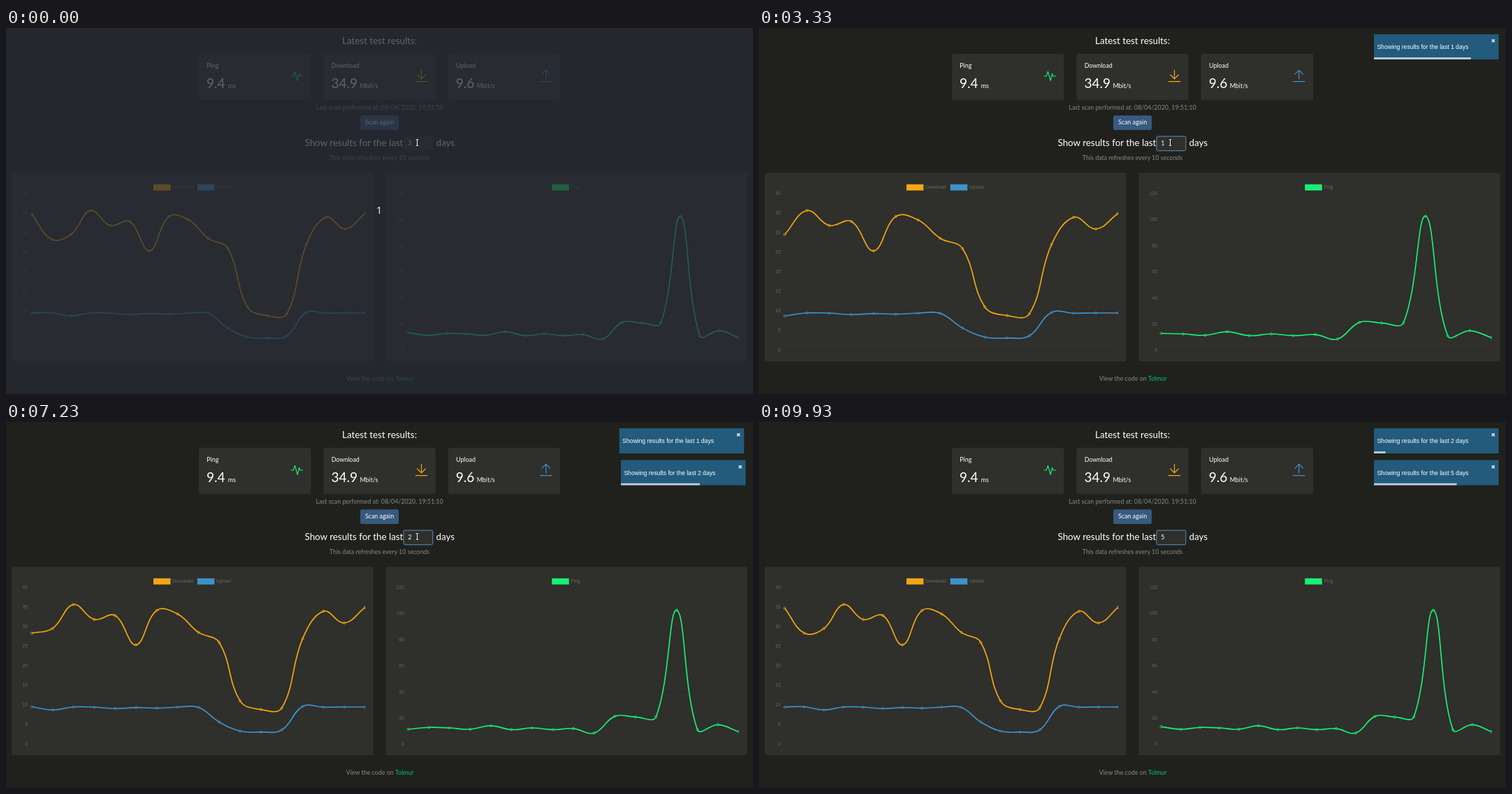
An HTML page that plays this animation: 1069 px wide and 524 px high, repeating every 9960 ms.

```html
<!DOCTYPE html>
<html lang="en">
<head>
<meta charset="utf-8">
<title>Speed test dashboard</title>
<style>
  html, body { margin: 0; width: 100%; height: 100%; overflow: hidden; background: #20211c; }
  svg { display: block; width: 100%; height: 100%; }
  text { font-family: Lato, sans-serif; font-size: 8.9px; fill: #fff; }
  .head { font-size: 13.37px; }
  .big { font-size: 19px; }
  .muted { fill: #888; }
  .mid { text-anchor: middle; }
  .axis { font: 6.7px "Liberation Sans", Arial, sans-serif; fill: #666; }
  .end { text-anchor: end; }
  .card { fill: #2f2f2c; }
  .icon { fill: none; stroke-width: 1.2; stroke-linecap: round; stroke-linejoin: round; }
  .grid { stroke: #000; stroke-opacity: .12; stroke-width: .6; }
  .line { fill: none; stroke-width: 1.67; }
  .dots { fill: rgba(0, 0, 0, .1); stroke-width: .7; }
  .note { font: 8.6px "Liberation Sans", Arial, sans-serif; }
  .cross { font: 7.6px "DejaVu Sans", sans-serif; fill-opacity: .85; }
</style>
</head>
<body>
<svg id="stage" viewBox="0 0 1069 524" preserveAspectRatio="none">
  <clipPath id="clipL"><rect x="0" y="200" width="514.4" height="290"/></clipPath>
  <clipPath id="clipR"><rect x="540" y="200" width="508.9" height="290"/></clipPath>

  <text class="head mid" x="534.5" y="22.6">Latest test results:</text>
  <g id="cards"></g>
  <path class="icon" stroke="#17f172" d="M408 69h3.2l2.3-6.6 3.6 13 2.5-10 1.4 3.6h3.7"/>
  <path class="icon" stroke="#f3a712" d="M594.5 60.3v12.4M588.7 67l5.8 5.8 5.8-5.8M586.3 76.6h16.4"/>
  <path class="icon" stroke="#3f92c8" d="M772.7 73V60.4M766.9 66.2l5.8-5.8 5.8 5.8M764.5 76.6h16.4"/>

  <text class="muted mid" x="534.5" y="116.8">Last scan performed at: 08/04/2020, 19:51:10</text>
  <rect x="507" y="125.2" width="55" height="20.8" rx="2.2" fill="#375a7f"/>
  <text class="mid" x="534.5" y="137.9">Scan again</text>

  <text class="head" x="427.5" y="169">Show results for the last</text>
  <text class="head" x="615.5" y="169">days</text>
  <rect class="card" x="569.3" y="155.4" width="41" height="20" rx="2.2"/>
  <g id="ring" fill="none">
    <rect x="568.6" y="154.7" width="42.6" height="21.4" rx="2.6" stroke="#375a7f" stroke-opacity=".6" stroke-width="1.2"/>
    <rect x="569.2" y="155.3" width="41.4" height="20.2" rx="2.2" stroke="#6485aa" stroke-width=".8"/>
  </g>
  <text id="days" x="575.2" y="167.6">3</text>
  <rect id="caret" y="160.8" width=".8" height="9" fill="#fff"/>
  <text class="muted mid" x="534.5" y="189.4">This data refreshes every 10 seconds</text>

  <g id="charts"></g>
  <text class="muted" x="486.7" y="505">View the code on <tspan fill="#00bc8c">Tolmur</tspan></text>
  <g id="toasts"></g>

  <g id="count">
    <rect width="1069" height="524" fill="#262a33" fill-opacity=".73"/>
    <text class="mid" x="534" y="266.3" style="font: 14px 'Open Sans', sans-serif">1</text>
  </g>
  <g id="pointer" fill="none" stroke-linecap="square">
    <path stroke="#111" stroke-width="2.4" d="M587 159.8h3M588.5 159.8v8.4M587 168.2h3"/>
    <path stroke="#fff" stroke-width="1.1" d="M587 159.8h3M588.5 159.8v8.4M587 168.2h3"/>
  </g>
</svg>
<script>
const LOOP = 9960, SCALE = 0.5575;
const TOP = 236.7, BASE = 461;
const $ = id => document.getElementById(id);
const clamp = (v, a, b) => Math.min(b, Math.max(a, v));
const mix = (a, b, k) => a + (b - a) * k;

function add(parent, tag, attrs, text) {
  const el = document.createElementNS('http://www.w3.org/2000/svg', tag);
  for (const k in attrs) el.setAttribute(k, attrs[k]);
  if (text) el.textContent = text;
  return parent.appendChild(el);
}

function bezier(x1, y1, x2, y2) {
  const at = (a, b, u) => 3 * (1 - u) * (1 - u) * u * a + 3 * (1 - u) * u * u * b + u * u * u;
  return x => {
    if (x <= 0) return 0;
    if (x >= 1) return 1;
    let lo = 0, hi = 1;
    for (let i = 0; i < 30; i++) {
      const m = (lo + hi) / 2;
      if (at(x1, x2, m) < x) lo = m; else hi = m;
    }
    return at(y1, y2, lo);
  };
}
const ease = bezier(.25, .1, .25, 1);
const easeInOut = bezier(.42, 0, .58, 1);
const bounce = bezier(.215, .61, .355, 1);
const outQuart = t => 1 - Math.pow(1 - clamp(t, 0, 1), 4);

// Value along [position, value] stops, eased within each segment
function track(stops, p, fn) {
  for (let i = 1; i < stops.length; i++) {
    const [a, from] = stops[i - 1], [b, to] = stops[i];
    if (p <= b) return mix(from, to, fn((p - a) / (b - a)));
  }
  return stops[stops.length - 1][1];
}

// Result cards
[[276, 'Ping', '9.4', 'ms', 41.7],
 [454.4, 'Download', '34.9', 'Mbit/s', 52],
 [632.7, 'Upload', '9.6', 'Mbit/s', 41]].forEach(([x, name, value, unit, gap]) => {
  const g = $('cards');
  add(g, 'rect', { class: 'card', x, y: 36.7, width: 160.3, height: 66.5, rx: 2.2 });
  add(g, 'text', { x: x + 11.3, y: 56.7 }, name);
  add(g, 'text', { class: 'big', x: x + 11.1, y: 86.4 }, value);
  add(g, 'text', { x: x + gap, y: 86.4 }, unit);
});

// Charts
const ORANGE = '#f3a712', BLUE = '#3f92c8', GREEN = '#17f172';
const download = [34.7, 28.3, 29.5, 35.6, 31.8, 32.8, 25.3, 34.1, 33.2, 28.5, 25.9, 11, 8.8, 9.2, 26.9, 33.9, 30.9, 34.9];
const upload = [9.45, 9.5, 8.7, 9.45, 9.4, 9.05, 9.3, 9.15, 9.4, 9.35, 5.6, 3.3, 3.05, 3.6, 9.6, 9.4, 9.45, 9.45];
const ping = [13.3, 11.3, 12.7, 12.3, 11.3, 14, 11, 12.3, 11, 11.8, 8.4, 21.2, 20.7, 21, 102.5, 11, 14.8, 9.4];
const stages = [[-2000, 18], [2247, 16], [5465, 17], [8328, 18]];

function axes(x, left, right, step, labelX) {
  const g = $('charts');
  add(g, 'rect', { class: 'card', x, y: 207.2, width: 517.4, height: 270, rx: 2.2 });
  const rows = step === 5 ? 8 : 6;
  for (let i = 0; i <= rows; i++) {
    const y = mix(BASE, TOP, i / rows);
    add(g, 'path', { class: 'grid', d: `M${left - 3} ${y}H${right}` });
    add(g, 'text', { class: 'axis end', x: labelX, y: y + 2.4 }, String(i * step));
  }
}
function legend(x, fill, name) {
  add($('charts'), 'rect', { x, y: 223.8, width: 24.5, height: 8.8, fill });
  add($('charts'), 'text', { class: 'axis', x: x + 27, y: 230 }, name);
}
axes(8.3, 36.7, 514, 5, 31);
axes(543.3, 575.4, 1048.5, 20, 570);
legend(211, ORANGE, 'Download');
legend(273.8, BLUE, 'Upload');
legend(781.2, GREEN, 'Ping');

// Points with their spline handles: [x, y, inX, inY, outX, outY]
function layout(data, n, left, right, max) {
  const pts = data.slice(-n).map((v, i) =>
    [mix(left, right, i / (n - 1)), mix(BASE, TOP, v / max)]);
  return pts.map((c, i) => {
    const p = pts[i - 1] || c, q = pts[i + 1] || c;
    const a = Math.hypot(c[0] - p[0], c[1] - p[1]);
    const b = Math.hypot(q[0] - c[0], q[1] - c[1]);
    const handle = k => [
      clamp(c[0] + k * (q[0] - p[0]), left, right),
      clamp(c[1] + k * (q[1] - p[1]), TOP, BASE)];
    return [...c, ...handle(-.4 * a / (a + b)), ...handle(.4 * b / (a + b))];
  });
}

function series(data, color, left, right, max, clip) {
  const g = add($('charts'), 'g', { 'clip-path': `url(#${clip})`, stroke: color });
  const line = add(g, 'path', { class: 'line' });
  const dots = add(g, 'path', { class: 'dots' });
  const views = stages.map(s => layout(data, s[1], left, right, max));
  return t => {
    let k = stages.length - 1;
    while (k > 0 && t < stages[k][0]) k--;
    const e = outQuart((t - stages[k][0]) / 1000);
    const before = views[Math.max(0, k - 1)];
    const pts = views[k].map((p, i) =>
      before[i] ? p.map((v, j) => mix(before[i][j], v, e)) : p);
    line.setAttribute('d', pts.map((p, i) => i
      ? `C${pts[i - 1][4]} ${pts[i - 1][5]} ${p[2]} ${p[3]} ${p[0]} ${p[1]}`
      : `M${p[0]} ${p[1]}`).join(''));
    dots.setAttribute('d', pts.map(p =>
      `M${p[0] - 1.67} ${p[1]}a1.67 1.67 0 1 1 3.34 0a1.67 1.67 0 1 1-3.34 0z`).join(''));
  };
}
const drawSeries = [
  series(upload, BLUE, 36.8, 514, 40, 'clipL'),
  series(download, ORANGE, 36.8, 514, 40, 'clipL'),
  series(ping, GREEN, 575.5, 1048.6, 120, 'clipR')
];

// Notifications
const T_W = 178.5, T_X = 880, T_Y = 8.9, PITCH = 45.6;
function toast(start, days, slot) {
  const g = add($('toasts'), 'g', {});
  add(g, 'rect', { width: T_W, height: 36, rx: .5, fill: '#225b7c' });
  add(g, 'text', { class: 'note', x: 4.4, y: 21 }, `Showing results for the last ${days} days`);
  add(g, 'text', { class: 'cross mid', x: 170.6, y: 12.4 }, '✖');
  const bar = add(g, 'rect', { y: 33.2, height: 2.8, fill: '#fff', 'fill-opacity': .7 });
  return t => {
    const age = t - start, enter = age / 750, leave = (age - 4990) / 750;
    const visible = age >= 0 && leave < 1;
    g.setAttribute('visibility', visible ? 'visible' : 'hidden');
    if (!visible) return;
    let dx, alpha;
    if (leave > 0) {
      dx = track([[0, 0], [.2, -20], [1, 2000]], leave, ease);
      alpha = track([[0, 1], [.2, 1], [1, 0]], leave, ease);
    } else {
      dx = track([[0, 3000], [.6, -25], [.75, 10], [.9, -5], [1, 0]], enter, bounce);
      alpha = track([[0, 0], [.6, 1]], enter, bounce);
    }
    const lift = slot ? ease((t - 7955) / 300) : 0;
    g.setAttribute('transform', `translate(${T_X + dx * SCALE} ${T_Y + PITCH * (slot - lift)})`);
    g.setAttribute('opacity', alpha);
    bar.setAttribute('width', T_W * clamp(1 - age / 5000, 0, 1));
  };
}
const drawToasts = [toast(2217, 1, 0), toast(5395, 2, 1), toast(8250, 5, 2)];

// Day field: [time cleared, time typed, value]
const edits = [[1570, 1700, '1'], [4750, 4880, '2'], [7600, 7733, '5']];
function drawField(t) {
  let value = '3', caret = t >= 500 && t < 1070;
  for (const [cleared, typed, digit] of edits) {
    if (t < cleared) break;
    value = t < typed ? '' : digit;
    const since = t - typed - 680;
    caret = t < typed || (since >= 0 && since % 1000 < 500);
  }
  $('days').textContent = value;
  $('caret').setAttribute('x', value ? 581 : 575.4);
  $('caret').setAttribute('visibility', caret ? 'visible' : 'hidden');
  $('ring').setAttribute('opacity', easeInOut((t - 485) / 150));
}

const show = (id, on) => $(id).setAttribute('visibility', on ? 'visible' : 'hidden');
function draw(t) {
  show('count', t < 30);
  show('pointer', t < 9920);
  drawField(t);
  drawSeries.forEach(f => f(t));
  drawToasts.forEach(f => f(t));
}

const begin = performance.now();
function tick(now) {
  draw(Math.max(0, now - begin) % LOOP);
  requestAnimationFrame(tick);
}
draw(0);
requestAnimationFrame(tick);
</script>
</body>
</html>
```
